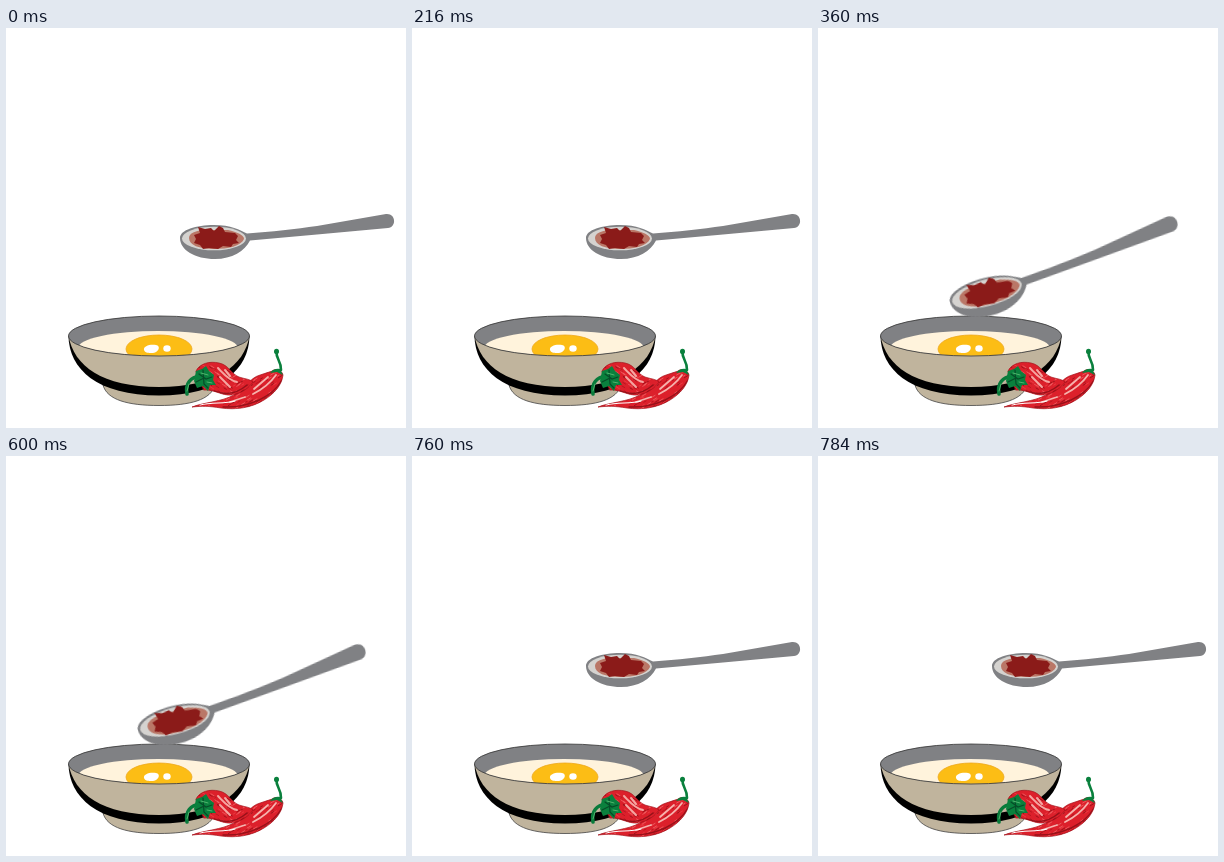
Write an HTML page that moves like this. It is 400 px wide and 400 px high and loops after 800 ms.

```html
<!DOCTYPE html>
<html lang="en">
<head>
<meta charset="utf-8">
<title>Egg bowl and chilli spoon</title>
<style>
  html, body { margin: 0; width: 100%; height: 100%; overflow: hidden; background: #fff; }
  svg { display: block; width: 100%; height: 100%; }
  #spoon { transform-origin: 0 0; animation: dip 800ms step-end infinite; }
  @keyframes dip {
    0%, 95%, 100% { transform: none; }
    45% { transform: translate(170.5px, 268.5px) rotate(-14.8deg) scale(1.122) translate(-208.5px, -214px); }
  }
</style>
</head>
<body>
<svg viewBox="0 0 400 400">
  <defs>
    <clipPath id="rim"><ellipse cx="153" cy="308" rx="90.5" ry="19.8"/></clipPath>
    <path id="podA" d="M190 343C194 335 204 333 213 335C223 337 225 346 233 349C239 351 244 351 247 354C243 360 236 365 226 367C216 368 208 361 198 362Z"/>
    <path id="podB" d="M266 343C270 340 276 342 277 347C276 357 268 366 258 372C245 380 230 382 215 380C203 378 196 378 186 379C199 374 215 374 228 367C240 361 243 350 254 347Z"/>
    <clipPath id="pods"><use href="#podA"/><use href="#podB"/></clipPath>
  </defs>

  <g id="bowl">
    <path d="M97 357C101 372 122 377.500 153 377.500S205 372 209 357Z" fill="#c0b49d" stroke="#444" stroke-width=".8"/>
    <path d="M62.500 308C63 341 91 367.500 153 367.500S243 341 243.500 308Z" fill="#000"/>
    <path d="M62.500 308C68 338 96 359 153 359S238 338 243.500 308Z" fill="#c0b49d"/>
    <ellipse cx="153" cy="308" rx="90.500" ry="20" fill="#808184"/>
    <g clip-path="url(#rim)">
      <ellipse cx="152" cy="320" rx="80" ry="17" fill="#fff3dc"/>
      <ellipse cx="153" cy="321" rx="33" ry="14" fill="#fcbd15" stroke="#eea71b" stroke-width=".8"/>
      <path d="M138 322C137 318 144 316 150 317C155 318 153 324 147 325C142 325 139 325 138 322Z" fill="#fff"/>
      <ellipse cx="161" cy="320.500" rx="3.700" ry="3.200" fill="#fff"/>
    </g>
    <ellipse cx="153" cy="308" rx="90.500" ry="20" fill="none" stroke="#333" stroke-width=".8"/>
  </g>

  <g id="peppers" stroke-linecap="round" fill="none">
    <use href="#podB" fill="#dc202b" stroke="#a3151d" stroke-width=".7"/>
    <use href="#podA" fill="#dc202b" stroke="#a3151d" stroke-width=".7"/>
    <g clip-path="url(#pods)">
      <g id="grain" stroke-width=".8"></g>
      <path d="M212 340C217 345 222 352 231 354M219 342L224 348M214 349L224 359" stroke="#f5a5a1" stroke-width="2"/>
      <path d="M270 347C265 354 257 361 247 366M262 349L248 361M239 369L224 374" stroke="#f6b2ad" stroke-width="1.800"/>
      <path d="M194 377C207 374 218 376 229 373" stroke="#fff" stroke-width="1.200"/>
      <path d="M208 363Q226 370 241 357M276 352C267 368 244 380 217 379" stroke="#971119" stroke-width="1.400"/>
    </g>
    <path d="M194 348C185 349 179 355 181 366" stroke="#087b3b" stroke-width="3.600"/>
    <path d="M190 343L196 341L200 338L203 343L208 347L207 352L210 357L204 357L202 363L197 358L191 360L188 353Z" fill="#0a803d"/>
    <path d="M193 346L200 351L206 349M197 342L198 356L202 360M190 354L198 350" stroke="#064c28" stroke-width="1.200"/>
    <path d="M195 345L202 347M201 354L206 355M183 356L181 363" stroke="#51b46d" stroke-width="1"/>
    <path d="M270.500 324C270 331 275 332 275 342" stroke="#0a803d" stroke-width="2.600"/>
    <ellipse cx="270.500" cy="323.500" rx="2.500" ry="2.800" fill="#0a803d"/>
    <path d="M264 345Q268 340 274 341L277 347L271 344Z" fill="#0a803d"/>
  </g>

  <g id="spoon">
    <path d="M174 210C174 202 190 197 208 197C225 197 234 202 241 205.500C265 204 290 201 311 198L380 186C390 185 391 199 382 200L311 206.500L244 212.500C239 223 226 231 209 231C189 231 174 222 174 210Z" fill="#808184"/>
    <ellipse cx="208" cy="210.500" rx="32" ry="11.800" fill="#d5d3d0"/>
    <path d="M183 210C183 205 190 203 196 202L222 202C231 204 238 207 238 211C235 218 222 221 208 221C193 221 183 217 183 210Z" fill="#ba7767"/>
    <path d="M188 207L194 205L192 199L199 201L205 200L208 203L213 198L217 200L219 204L229 205L232 208L230 212L233 215L227 216L225 219L217 218L212 221L203 220L197 221L194 217L188 215L190 211Z" fill="#8b1b19"/>
  </g>
</svg>
<script>
  // Seeded grain gives the pods their engraved look.
  let seed = 11;
  const rand = () => (seed = seed * 16807 % 2147483647) / 2147483647;
  const tones = ["#8f1018", "#b0131d", "#f0686a", "#ee4248"];
  let marks = "";
  for (let i = 0; i < 230; i++) {
    const x = 186 + rand() * 90, y = 335 + rand() * 46;
    const dx = 1 + rand() * 3, dy = x < 225 && y < 365 ? dx * 0.6 : -dx * 0.6;
    marks += `<path d="M${x} ${y}l${dx} ${dy}" stroke="${tones[i % 4]}"/>`;
  }
  document.getElementById("grain").innerHTML = marks;
</script>
</body>
</html>
```
